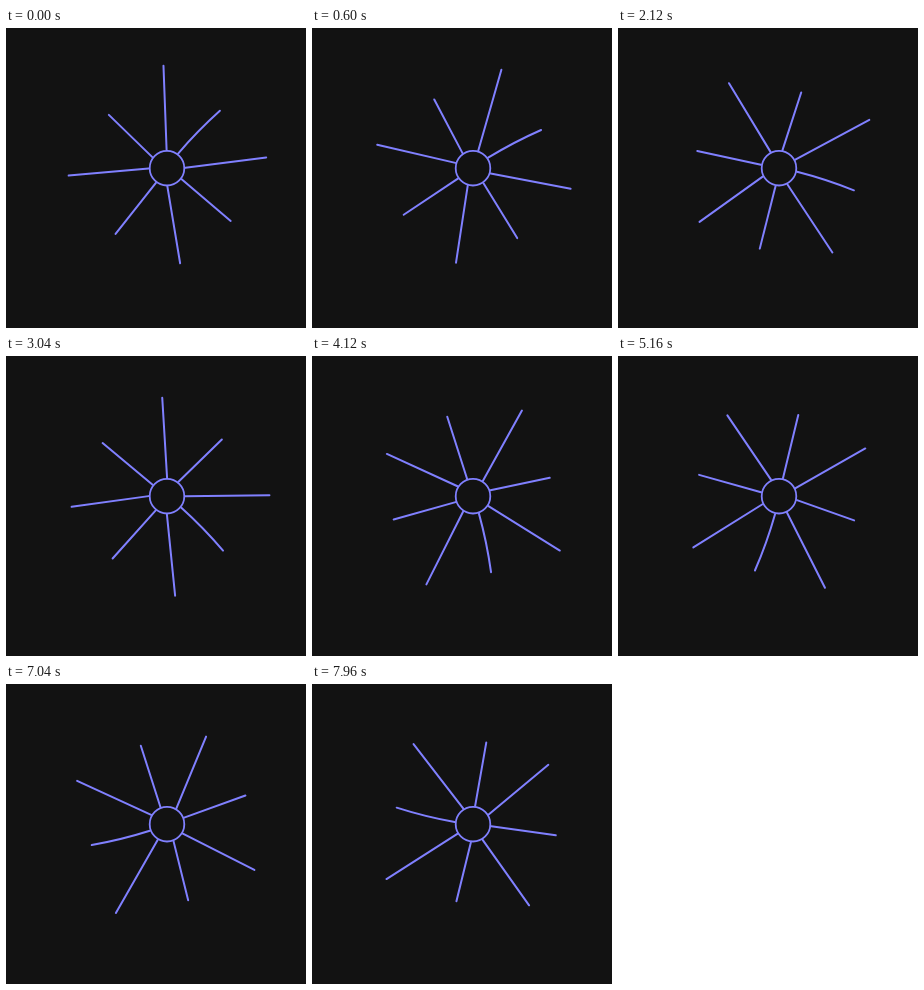
Animation of 300 by 300 pixels, one loop 8 s. Source, as an HTML page:

```html
<!DOCTYPE html>
<html lang="en">
<head>
<meta charset="utf-8">
<title>Turning sun</title>
<style>
  html, body { margin: 0; width: 100%; height: 100%; overflow: hidden; background: #121212; }
  svg { display: block; width: 100%; height: 100%; }
</style>
</head>
<body>
<svg viewBox="0 0 300 300">
  <g transform="translate(161 140.2)" fill="none" stroke="#8080ff" stroke-width="2" stroke-linecap="round">
    <circle r="17.3" stroke-width="1.8"/>
    <g id="rays"></g>
  </g>
</svg>
<script>
const LOOP = 8000;
const TURN = 11960; // ms for one full turn
const HUB = 18.4;
const TIP_ANGLES = [-2, 42.6, 83.8, 129.6, 172.1, 218, 265.7, 312.5];

const rays = document.getElementById('rays');

// Angles run clockwise from straight up.
function polar(deg, r) {
  const a = deg * Math.PI / 180;
  return [r * Math.sin(a), -r * Math.cos(a)];
}

// Long and short rays alternate, slightly uneven as if drawn by hand.
function rayPath(angle, i) {
  const side = i % 2 ? -1 : 1;
  const uneven = 3.3 * Math.cos((i * 45 - 10) * Math.PI / 180);
  const [x0, y0] = polar(i * 45 - 4.6 + side * 3.3, HUB);
  const [x1, y1] = polar(angle, 90 + side * (9.2 + uneven));
  const [bx, by] = polar(angle - 90, i === 1 ? 2 : 0);
  return `M${x0} ${y0}Q${(x0 + x1) / 2 + bx} ${(y0 + y1) / 2 + by} ${x1} ${y1}`;
}

TIP_ANGLES.forEach((angle, i) => {
  const path = document.createElementNS('http://www.w3.org/2000/svg', 'path');
  path.setAttribute('d', rayPath(angle, i));
  rays.append(path);
});

function draw(t) {
  rays.setAttribute('transform', `rotate(${360 * t / TURN})`);
}

const start = performance.now();
function tick() {
  draw((performance.now() - start) % LOOP);
  requestAnimationFrame(tick);
}
draw(0);
requestAnimationFrame(tick);
</script>
</body>
</html>
```
